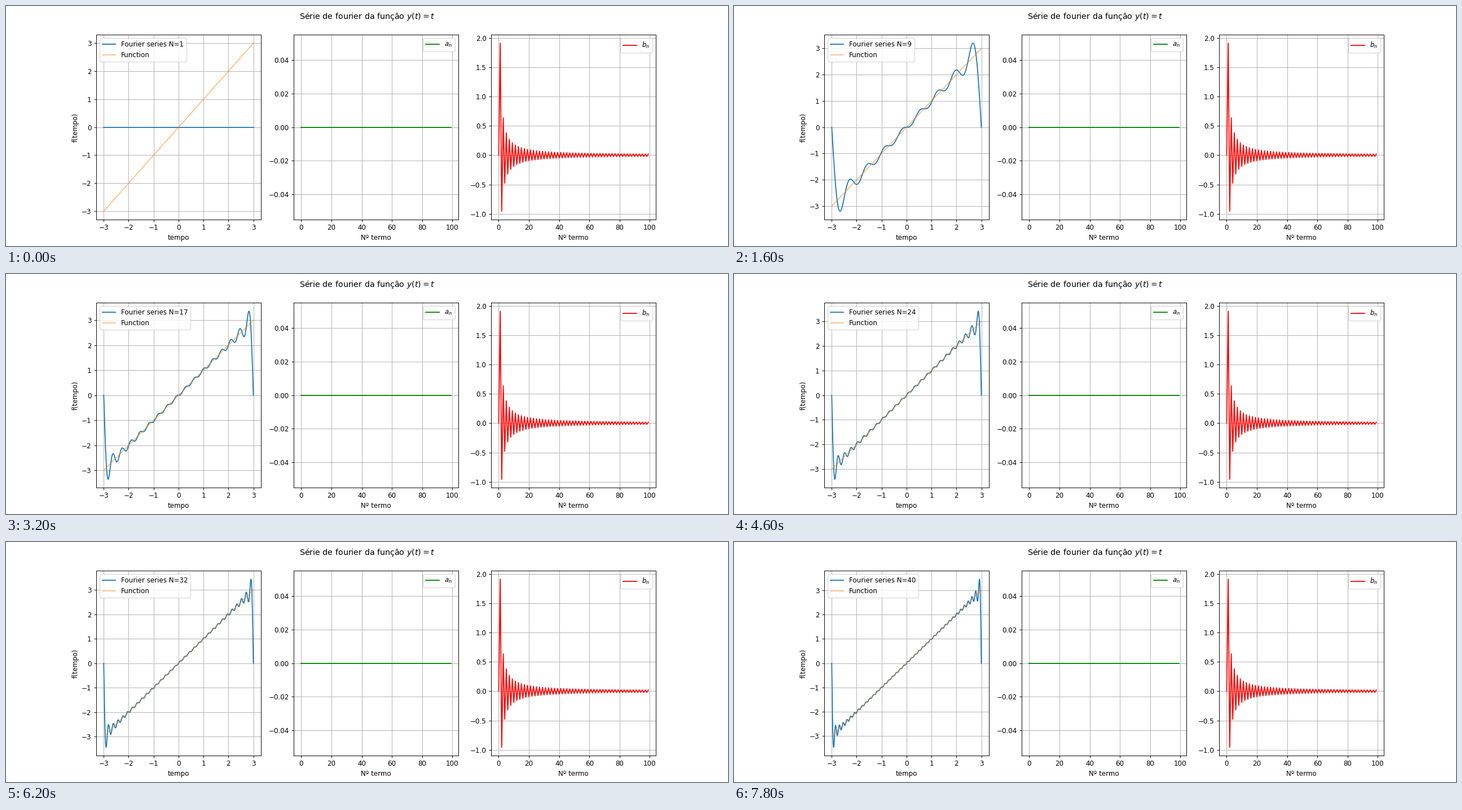
Animation of 1280 by 427 pixels, one loop 8000 ms. Source, as a matplotlib script:

```python
import numpy as np
import matplotlib.pyplot as plt
from matplotlib.animation import FuncAnimation

WIDTH, HEIGHT = 1280, 427
FIG_INCHES = 15
FRAMES, INTERVAL = 40, 200
HALF_PERIOD = 3
COEFFS = 100

t = np.linspace(-HALF_PERIOD, HALF_PERIOD, 1000)
n = np.arange(COEFFS)
a = np.zeros(COEFFS)
b = np.zeros(COEFFS)
b[1:] = 2 * HALF_PERIOD / np.pi * (-1.0) ** (n[1:] + 1) / n[1:]
harmonics = b[:, None] * np.sin(np.outer(n, t) * np.pi / HALF_PERIOD)


def series(count):
    """Partial sum of the first count terms, the constant one included."""
    return harmonics[:count].sum(axis=0)


def series_label(count):
    return f"Fourier series N={count}"


def plot_coeffs(ax, values, color, label):
    ax.plot(n, values, color=color, label=label)
    ax.set_xlabel("Nº termo")
    ax.legend(loc="upper right")
    ax.grid()


fig, (ax_t, ax_a, ax_b) = plt.subplots(
    1, 3, figsize=(FIG_INCHES, HEIGHT * FIG_INCHES / WIDTH), dpi=WIDTH / FIG_INCHES
)
fig.suptitle("Série de fourier da função $y(t) = t$")

(curve,) = ax_t.plot(t, series(1), label=series_label(1))
ax_t.plot(t, t, alpha=0.5, label="Function")
ax_t.set_xlabel("tempo")
ax_t.set_ylabel("f(tempo)")
ax_t.grid()
legend = ax_t.legend(loc="upper left")

plot_coeffs(ax_a, a, "green", "$a_n$")
plot_coeffs(ax_b, b, "red", "$b_n$")


def update(frame):
    count = frame + 1
    curve.set_ydata(series(count))
    legend.get_texts()[0].set_text(series_label(count))
    ax_t.relim()
    ax_t.autoscale_view()
    return (curve,)


anim = FuncAnimation(fig, update, frames=FRAMES, interval=INTERVAL, repeat=True)
plt.show()
```
